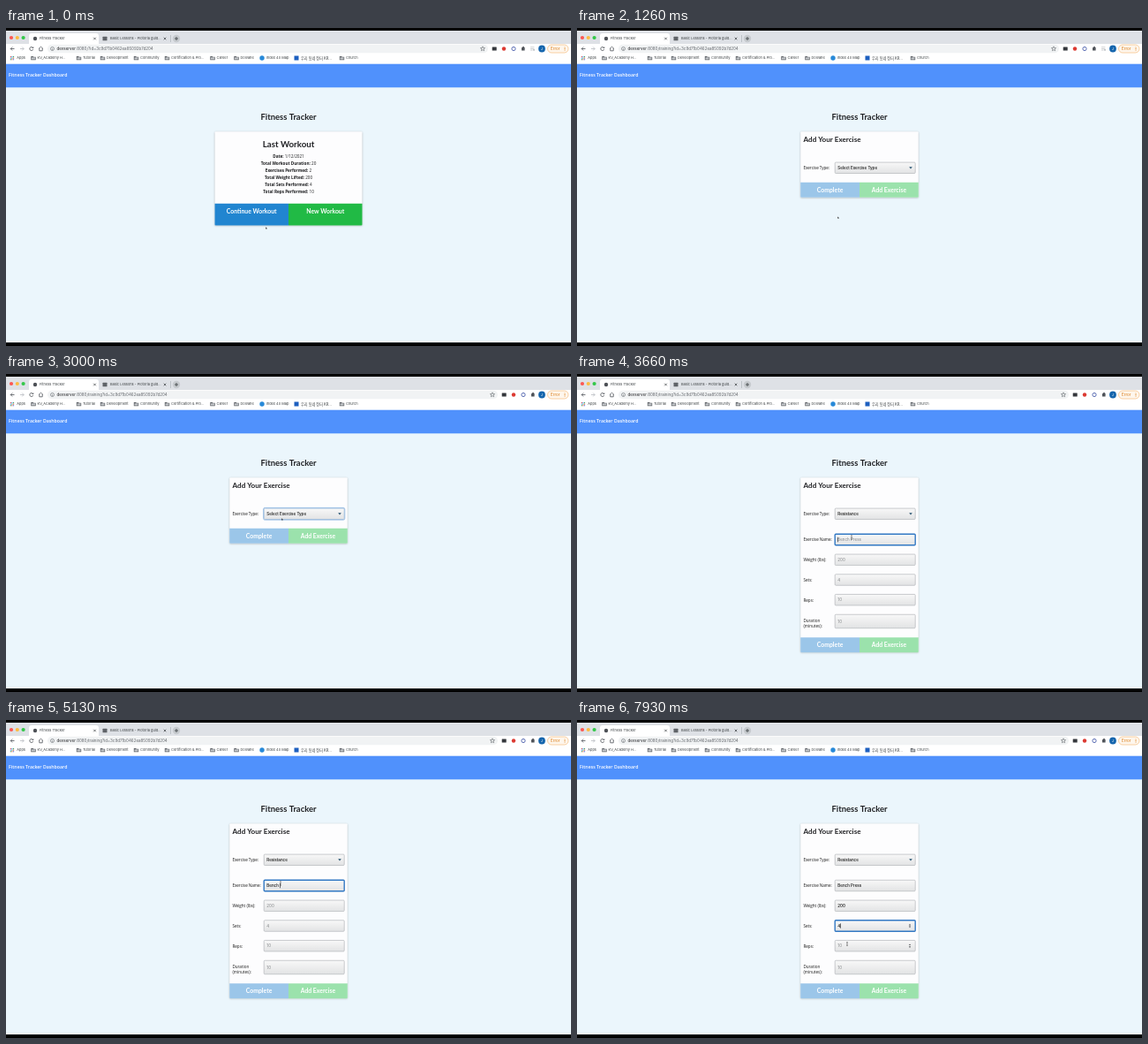
Animation of 640 by 360 pixels, one loop 8 s. Source, as an HTML page with a canvas:

```html
<!DOCTYPE html>
<html lang="en">
<head>
<meta charset="utf-8">
<title>Fitness Tracker</title>
<style>
  html, body { margin: 0; width: 100%; height: 100%; overflow: hidden; background: #ebf6fc; }
  canvas { display: block; width: 640px; height: 360px; }
</style>
</head>
<body>
<canvas id="stage"></canvas>
<script>
const LOOP = 8000;
const PAGE_AT = 1260, ICON_AT = 2200, SELECT_AT = 2200, FORM_AT = 3130;
const UI = 'Inter, sans-serif';
const OPEN = '"Open Sans", sans-serif';
const LATO = 'Lato, sans-serif';
const KOREAN = '"Noto Sans CJK KR", "Noto Sans CJK", sans-serif';
const ID = '3c9d71b0462ea85092b7d204';
const FIELD_SIZE = 4.5;

// Pointer keys: time, x, y
const PATH = [
  [0, 295, 226.5], [60, 295, 226.5], [260, 295, 220], [660, 296, 214.7], [1330, 296, 214.7],
  [1800, 312, 171], [2060, 313, 164.5], [3130, 313, 164.5], [3530, 311, 185],
  [5860, 311, 185], [6200, 302.5, 210], [6860, 302.5, 210], [7200, 306, 232],
  [7600, 306, 232], [7860, 306, 253.5]
];

const FIELDS = [
  { y: 187.5, h: 12.5, label: ['Exercise Name:'], hint: 'Bench Press', focus: 3600, blur: 6230,
    keys: [4130, 4260, 4530, 4730, 4860, 5000, 5260, 5400, 5530, 5660, 5800] },
  { y: 210.3, h: 12.5, label: ['Weight (lbs):'], hint: '200', number: true, focus: 6230, blur: 7260,
    keys: [6400, 6600, 6800] },
  { y: 233, h: 12.5, label: ['Sets:'], hint: '4', number: true, focus: 7260, blur: LOOP, keys: [7560] },
  { y: 255.7, h: 12.5, label: ['Reps:'], hint: '10', number: true, keys: [] },
  { y: 280, h: 15.5, label: ['Duration', '(minutes):'], hint: '10', number: true, keys: [] }
];

const STATS = [
  ['Date', '1/12/2021'], ['Total Workout Duration', '20'], ['Exercises Performed', '2'],
  ['Total Weight Lifted', '200'], ['Total Sets Performed', '4'], ['Total Reps Performed', '10']
];

const FOLDERS = [
  [31, 'KV_Academy H...'], [82.5, 'Tutorial'], [109.5, 'Development'], [147.5, 'Community'],
  [182.5, 'Certification & Pro...'], [234, 'Career'], [261, 'Dolvane'], [380.5, 'Church']
];

const canvas = document.getElementById('stage');
const ctx = canvas.getContext('2d');
const dpr = window.devicePixelRatio || 1;
canvas.width = 640 * dpr;
canvas.height = 360 * dpr;

function rect(x, y, w, h, fill) {
  ctx.fillStyle = fill;
  ctx.fillRect(x, y, w, h);
}

function rounded(x, y, w, h, r, fill, stroke, width = 0.6) {
  ctx.beginPath();
  ctx.roundRect(x, y, w, h, r);
  if (fill) { ctx.fillStyle = fill; ctx.fill(); }
  if (stroke) { ctx.strokeStyle = stroke; ctx.lineWidth = width; ctx.stroke(); }
}

function disc(x, y, r, fill) {
  ctx.beginPath();
  ctx.arc(x, y, r, 0, Math.PI * 2);
  ctx.fillStyle = fill;
  ctx.fill();
}

function ring(x, y, r, stroke, width = 0.8, from = 0, to = Math.PI * 2) {
  ctx.beginPath();
  ctx.arc(x, y, r, from, to);
  ctx.strokeStyle = stroke;
  ctx.lineWidth = width;
  ctx.stroke();
}

function line(points, stroke, width = 0.8) {
  ctx.beginPath();
  points.forEach(([x, y]) => ctx.lineTo(x, y));
  ctx.strokeStyle = stroke;
  ctx.lineWidth = width;
  ctx.stroke();
}

function poly(points, fill) {
  ctx.beginPath();
  points.forEach(([x, y]) => ctx.lineTo(x, y));
  ctx.closePath();
  ctx.fillStyle = fill;
  ctx.fill();
}

// Small type is set eight times larger and scaled down to keep exact spacing.
// y is the middle of the capitals; returns the width.
function text(str, x, y, size, family, color, { weight = 400, align = 'left' } = {}) {
  ctx.save();
  ctx.translate(x, y + size * 0.36);
  ctx.scale(1 / 8, 1 / 8);
  ctx.font = `${weight} ${size * 8}px ${family}`;
  ctx.textAlign = align;
  ctx.fillStyle = color;
  ctx.fillText(str, 0, 0);
  const width = ctx.measureText(str).width / 8;
  ctx.restore();
  return width;
}

function measure(str, size, family, weight) {
  ctx.font = `${weight} ${size * 8}px ${family}`;
  return ctx.measureText(str).width / 8;
}

function cross(x, y, r, color) {
  line([[x - r, y - r], [x + r, y + r]], color, 0.7);
  line([[x - r, y + r], [x + r, y - r]], color, 0.7);
}

function star(x, y) {
  const points = [];
  for (let i = 0; i <= 10; i++) {
    const a = -Math.PI / 2 + i * Math.PI / 5, r = i % 2 ? 1.2 : 2.7;
    points.push([x + Math.cos(a) * r, y + Math.sin(a) * r]);
  }
  line(points, '#5f6368', 0.6);
}

function drawTabs() {
  rect(0, 3, 640, 15, '#dee1e6');
  ['#fc5753', '#fdbc40', '#34c84a'].forEach((c, i) => disc(6 + i * 6.8, 11, 2.1, c));
  rounded(26, 6, 79, 13, [3, 3, 0, 0], '#fff');
  disc(33, 12, 2.2, '#4d5156');
  text('Fitness Tracker', 38, 12, 3.95, UI, '#3c4043');
  cross(100.5, 12, 1.3, '#3c4043');
  rounded(109.5, 9.8, 5, 4.4, 0.5, '#5f6368');
  text('Basic Lessons - Plotoria guid...', 118, 12, 3.95, UI, '#3c4043');
  cross(180, 12, 1.3, '#3c4043');
  rect(186, 8, 0.5, 8, '#9aa0a6');
  disc(193, 12, 4.2, '#c6cace');
  line([[191, 12], [195, 12]], '#3c4043');
  line([[193, 10], [193, 14]], '#3c4043');
}

function drawToolbar(t) {
  rect(0, 18, 640, 23, '#fff');
  const dark = '#50545a', y = 23.5;
  line([[9.5, y], [5.2, y]], dark);
  line([[7.2, y - 2], [5.2, y], [7.2, y + 2]], dark);
  line([[16, y], [20.2, y]], '#b8bcc0');
  line([[18.2, y - 2], [20.2, y], [18.2, y + 2]], '#b8bcc0');
  ring(28.8, y, 2, dark, 0.8, 0.3, 5.3);
  poly([[29.2, y - 0.5], [31.2, y - 0.5], [31.2, y - 2.5]], dark);
  line([[37, y], [39.5, y - 2.3], [42, y]], dark);
  line([[37.8, y - 0.4], [37.8, y + 2.3], [41.2, y + 2.3], [41.2, y - 0.4]], dark);

  const shift = t < ICON_AT ? 0 : 11;
  rounded(47, 18.8, 499 + shift, 9.4, 4.7, '#f1f3f4');
  ring(52.5, y, 2, '#5f6368', 0.6);
  rect(52.2, y - 0.3, 0.6, 1.5, '#5f6368');
  const page = t < PAGE_AT ? '' : 'training';
  const host = text('devserver', 57.5, y, 4.5, UI, '#202124');
  text(`:8080/${page}?id=${ID}`, 57.5 + host, y, 4.5, UI, '#5f6368');

  star(540 + shift, y);
  rounded(550.7 + shift, y - 2.1, 5, 4.2, 0.4, '#35383d');
  disc(564 + shift, y, 2.2, '#dc3a32');
  ring(575 + shift, y, 2.1, '#5d6fb5', 1);
  rounded(584 + shift, y - 1.6, 3.6, 3.6, 0.5, '#50545a');
  disc(586 + shift, y - 1.8, 0.9, '#50545a');
  if (!shift) {
    [-1.6, 0, 1.6].forEach(d => rect(594, y + d - 0.3, d > 1 ? 2.6 : 4.4, 0.5, '#a3a7ab'));
    disc(598, y + 1.4, 0.8, '#a3a7ab');
  }
  disc(607, y, 3.9, '#1565ad');
  text('J', 607, y, 4, UI, '#fff', { align: 'center' });
  rounded(613.5, 19, 23.5, 9, 4.5, '#fef6ec', '#f3b26b', 0.6);
  text('Error', 617, y, 4.5, UI, '#d9770f');
  [-1.5, 0, 1.5].forEach(d => disc(633, y + d, 0.5, '#d9770f'));
}

function drawBookmarks() {
  const y = 34, size = 3.95, ink = '#3c4043';
  const tones = ['#de5246', '#4c8bf5', '#3ba55c'];
  for (let i = 0; i < 9; i++) {
    const col = i % 3, row = Math.floor(i / 3);
    rect(4.8 + col * 1.6, 32 + row * 1.6, 1.1, 1.1, tones[(i + row) % 3]);
  }
  text('Apps', 12.3, y, size, UI, ink);
  for (const [x, name] of FOLDERS) {
    poly([[x - 2.7, y - 2], [x - 0.4, y - 2], [x + 0.4, y - 1.3], [x + 2.7, y - 1.3], [x + 2.7, y + 2.2], [x - 2.7, y + 2.2]], '#5f6368');
    rect(x - 2, y - 0.7, 4, 2.2, '#c4c7ca');
    text(name, x + 4.5, y, size, UI, ink);
  }
  disc(290, y, 2.7, '#2789d8');
  text('Index 40 Map', 294.8, y, size, UI, ink);
  rect(326.5, y - 2.5, 5, 5, '#1d5fbf');
  text('우리 동네 장터 KR...', 334, y, 4.2, KOREAN, ink);
}

function shadowCard(x, y, w, h) {
  ctx.save();
  ctx.shadowColor = 'rgba(34, 36, 38, 0.35)';
  ctx.shadowBlur = 2 * dpr;
  ctx.shadowOffsetY = 0.4 * dpr;
  rounded(x, y, w, h, 1, '#fdfdfe');
  ctx.restore();
}

function buttons(x, y, w, h, labelY, items) {
  items.forEach(([label, color], i) => {
    const half = w / 2, left = x + half * i;
    rounded(left, y, half, h, i ? [0, 0, 1, 0] : [0, 0, 0, 1], color);
    text(label, left + half / 2, labelY, 6.85, LATO, '#fff', { weight: 700, align: 'center' });
  });
}

function drawHome() {
  shadowCard(236.5, 117.3, 167, 106.2);
  text('Last Workout', 320, 131.7, 9.7, LATO, '#202124', { weight: 700, align: 'center' });
  STATS.forEach(([name, value], i) => {
    const y = 145.7 + i * 8, size = 4.65, label = name + ':';
    const a = measure(label, size, OPEN, 700), b = measure(' ' + value, size, OPEN, 400);
    const x = 320 - (a + b) / 2;
    text(label, x, y, size, OPEN, '#1c1d1f', { weight: 700 });
    text(' ' + value, x + a, y, size, OPEN, '#1c1d1f');
  });
  buttons(236.5, 198.7, 167, 24.8, 207.8, [['Continue Workout', '#2185d0'], ['New Workout', '#21ba45']]);
}

function box(y, h, border, width) {
  const top = y - h / 2;
  const fill = ctx.createLinearGradient(0, top, 0, top + h);
  fill.addColorStop(0, '#f8f8f8');
  fill.addColorStop(1, '#e2e3e4');
  rounded(292.2, top, 91, h, 1, fill, border, width);
}

function spinner(y) {
  poly([[375.8, y - 0.6], [378.2, y - 0.6], [377, y - 2.3]], '#55585c');
  poly([[375.8, y + 0.6], [378.2, y + 0.6], [377, y + 2.3]], '#55585c');
}

function label(str, y) {
  text(str, 256.5, y, 4.55, OPEN, '#151515', { weight: 500 });
}

function drawField(field, t, pointer) {
  const { y, h, hint, keys, focus, blur } = field;
  const focused = t >= focus && t < blur;
  const firstLine = y + 0.3 - (field.label.length - 1) * 1.3;
  field.label.forEach((s, i) => label(s, firstLine + i * 6));
  box(y, h, focused ? '#3379c4' : '#b4b7ba', focused ? 1.4 : 0.7);

  const count = keys.filter(k => k <= t).length;
  const typed = hint.slice(0, count);
  text(typed || hint, 295.3, y, FIELD_SIZE, UI, count ? '#111' : '#808386', { weight: count ? 500 : 400 });

  const hovered = Math.abs(pointer.y - y) < h / 2;
  if (field.number && (focused || hovered)) spinner(y);
  if (focused) {
    const since = t - (count ? keys[count - 1] : focus);
    if (since % 1000 < 500) {
      const x = 295.4 + measure(typed, FIELD_SIZE, UI, 500);
      rect(x, y - 2.7, 0.6, 5.4, '#111');
    }
  }
}

function drawSelect(t) {
  const open = t >= FORM_AT, focused = t >= SELECT_AT && !open;
  if (focused) rounded(291.6, 151.4, 92.2, 13.8, 1.6, null, '#a4c6ea', 1);
  box(158.3, 12.4, focused ? '#8fb1d4' : '#b4b7ba', 0.7);
  text(open ? 'Resistance' : 'Select Exercise Type', 295.3, 158.2, FIELD_SIZE, UI, '#111', { weight: 500 });
  poly([[376.2, 157.2], [379.8, 157.2], [378, 159.4]], '#23506f');
}

function drawExercise(t, pointer) {
  const open = t >= FORM_AT;
  const bottom = open ? 315.2 : 191.8;
  shadowCard(253.2, 117.3, 133.6, bottom - 117.3);
  text('Add Your Exercise', 256.5, 125.7, 8.1, LATO, '#202124', { weight: 700 });
  label('Exercise Type:', 158.5);
  drawSelect(t);
  if (open) FIELDS.forEach(f => drawField(f, t, pointer));
  buttons(253.2, bottom - 17, 133.6, 17, bottom - 8.4, [['Complete', '#9bc6e9'], ['Add Exercise', '#9be2ac']]);
}

function pointerAt(t) {
  let i = PATH.length - 1;
  while (PATH[i][0] > t) i--;
  const a = PATH[i], b = PATH[i + 1] || a;
  const p = b === a ? 0 : (t - a[0]) / (b[0] - a[0]);
  const e = p * p * (3 - 2 * p);
  return { x: a[1] + (b[1] - a[1]) * e, y: a[2] + (b[2] - a[2]) * e };
}

function drawPointer(t, { x, y }) {
  const onField = t >= FORM_AT && FIELDS.some(f => Math.abs(f.y - y) < f.h / 2);
  if (onField) {
    rect(x - 0.3, y - 2.2, 0.6, 4.4, '#333');
    rect(x - 0.9, y - 2.5, 1.8, 0.4, '#555');
    rect(x - 0.9, y + 2.1, 1.8, 0.4, '#555');
  } else {
    poly([[x - 0.8, y - 1.2], [x + 0.9, y + 0.4], [x + 0.3, y + 1.1], [x - 0.8, y + 0.9]], '#333');
  }
}

function draw(t) {
  ctx.setTransform(dpr, 0, 0, dpr, 0, 0);
  rect(0, 0, 640, 360, '#000');
  rect(0, 41, 640, 315, '#ebf6fc');
  drawTabs();
  drawToolbar(t);
  drawBookmarks();
  rect(0, 40.7, 640, 26.6, '#5091fc');
  text('Fitness Tracker Dashboard', 3.1, 52.8, 5.2, OPEN, '#fff', { weight: 600 });
  text('Fitness Tracker', 320, 100.1, 9.45, LATO, '#202124', { weight: 700, align: 'center' });

  const pointer = pointerAt(t);
  if (t < PAGE_AT) drawHome();
  else drawExercise(t, pointer);
  drawPointer(t, pointer);
}

function tick() {
  draw(performance.now() % LOOP);
  requestAnimationFrame(tick);
}
tick();
</script>
</body>
</html>
```
